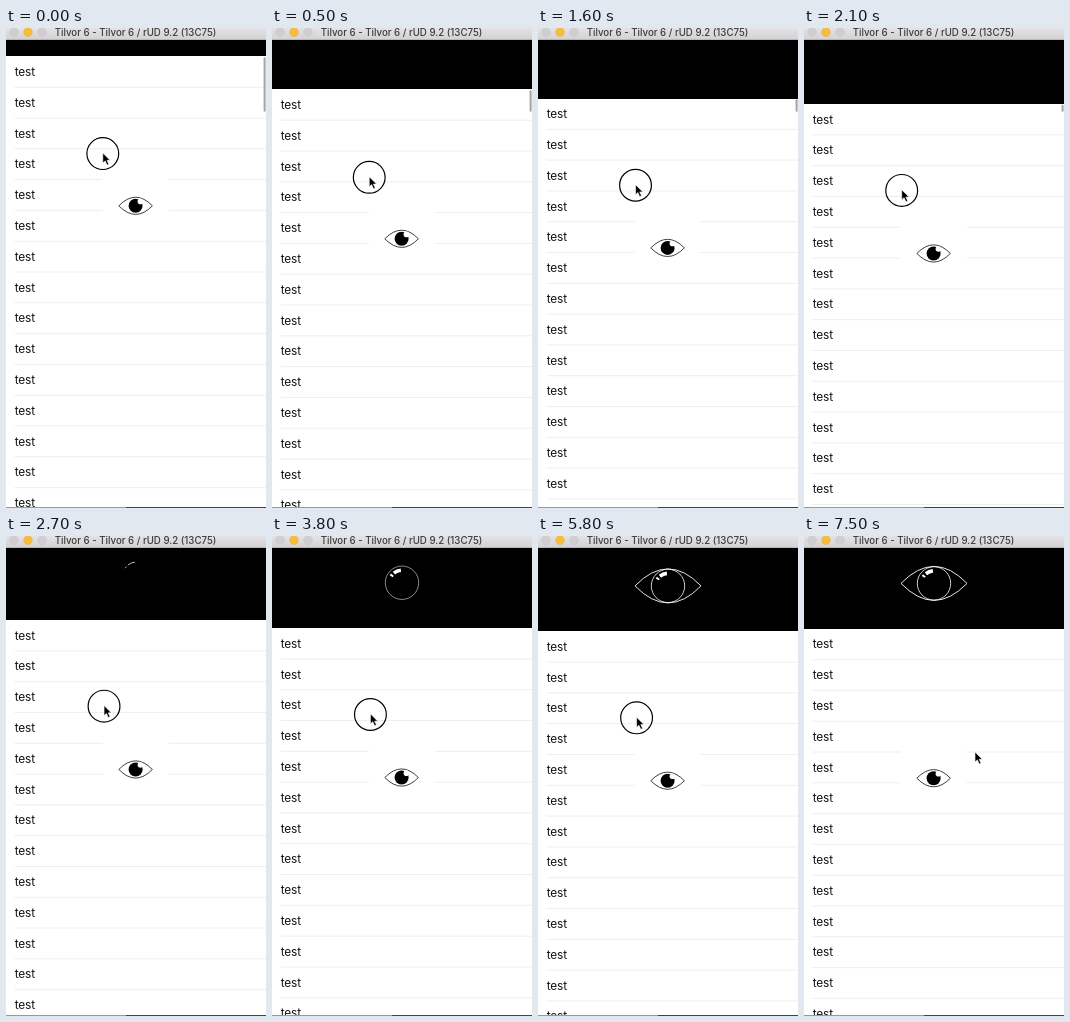
Animation of 260x480 px, one loop 8 s. Source, as an HTML page:

```html
<!DOCTYPE html>
<html lang="en">
<head>
<meta charset="utf-8">
<title>Pull to refresh</title>
<style>
  html, body { margin: 0; width: 100%; height: 100%; overflow: hidden; background: #fff; }
  svg { display: block; width: 100vw; height: 100vh; }
  text { font-family: Inter, Roboto, "Liberation Sans", sans-serif; }
  .row { font-size: 11.9px; letter-spacing: -0.2px; fill: #111; }
  .title { font-size: 9.7px; font-weight: 500; fill: #3c3c3c; text-anchor: middle; }
</style>
</head>
<body>
<svg viewBox="0 0 260 480" xmlns="http://www.w3.org/2000/svg">
  <defs>
    <linearGradient id="bar" x2="0" y2="1">
      <stop offset="0" stop-color="#e4e2e4"/>
      <stop offset="1" stop-color="#d2d0d2"/>
    </linearGradient>
  </defs>
  <rect width="260" height="480" fill="#fff"/>
  <rect id="header" y="12" width="260" fill="#000"/>

  <g id="list">
    <g id="rows"></g>
    <g transform="translate(129.6 149.4)">
      <rect x="-33" y="-33" width="66" height="66" fill="#fff"/>
      <path d="M-16.8 0Q0 -17.2 16.8 0Q0 17.2 -16.8 0Z" fill="#fff" stroke="#000" stroke-width="0.75"/>
      <circle r="7" fill="#000"/>
      <circle cx="4.8" cy="-4.4" r="2.8" fill="#fff"/>
    </g>
  </g>
  <rect id="scroll" x="257.6" width="2" rx="1" fill="#a4a4a4"/>

  <g id="eye" fill="none" stroke="#fff">
    <circle id="ball" r="16.7" stroke-width="0.8"/>
    <g id="lights"></g>
    <g id="lids" stroke-width="0.9">
      <path pathLength="1" d="M-33 0Q0 -34 33 0"/>
      <path pathLength="1" d="M-33 0Q0 34 33 0"/>
    </g>
  </g>

  <rect width="260" height="12" fill="url(#bar)"/>
  <rect y="11.4" width="260" height="0.6" fill="#a9a7a9"/>
  <g stroke-width="0.4">
    <circle cx="8" cy="4.1" r="4.4" fill="#d0ced0" stroke="#c2c0c2"/>
    <circle cx="22" cy="4.1" r="4.4" fill="#f8bc3b" stroke="#e6ab3c"/>
    <circle cx="36" cy="4.1" r="4.4" fill="#d0ced0" stroke="#c2c0c2"/>
  </g>
  <text class="title" x="129.5" y="8">Tilvor 6 - Tilvor 6 / rUD 9.2 (13C75)</text>

  <rect y="479" width="120" height="1" fill="#999"/>
  <rect x="120" y="479" width="140" height="1" fill="#444"/>

  <g id="pointer">
    <circle id="touch" cx="0" cy="0.6" r="15.9" fill="none" stroke="#000" stroke-width="1.2"/>
    <path d="M0 0V10L2.4 7.9L4.2 12L6 11.2L4.2 7.3H7.3Z" fill="#000" stroke="#fff" stroke-width="0.6"/>
  </g>
</svg>
<script>
const LOOP = 8000, STEP = 100, ROW = 30.8, TOP = 28.4;
const $ = id => document.getElementById(id);
const set = (el, attrs) => { for (const k in attrs) el.setAttribute(k, attrs[k]); };

const ramp = (t, from, to) => Math.min(1, Math.max(0, (t - from) / (to - from)));
const easeOut = (u, power) => 1 - (1 - u) ** power;

// Each stretch of the drag: start, end, distance, ease-out power
const drags = [
  [0, 500, 33, 1],
  [600, 1500, 8, 1],
  [1500, 2400, 10, 1],
  [2400, 3500, 11.7, 1.6],
  [3700, 4700, 4.2, 2.7]
];
const dragAt = t => drags.reduce((sum, [from, to, dist, power]) =>
  sum + dist * easeOut(ramp(t, from, to), power), 0);

function arc(r, from, to) {
  const at = deg => {
    const a = deg * Math.PI / 180;
    return `${r * Math.cos(a)} ${r * Math.sin(a)}`;
  };
  return `M${at(from)}A${r} ${r} 0 0 1 ${at(to)}`;
}

$("lights").innerHTML = `<path d="${arc(12.6, 211, 220)}"/><path d="${arc(12.6, 230, 265)}"/>`;

$("rows").innerHTML = Array.from({ length: 16 }, (_, i) => {
  const y = i * ROW;
  return `<text class="row" x="8.8" y="${y + 19.6}">test</text>` +
    `<path d="M8.5 ${y + ROW}H260" stroke="#ececec" stroke-width="0.9"/>`;
}).join("");

function drawEye(t, edge) {
  // Highlights thicken, then the ball fades in, then the lids are traced.
  const drawn = ramp(t, 3800, 4700);
  set($("eye"), { transform: `translate(130 ${edge - 45.4})` });
  set($("lights"), { "stroke-width": 3.6 * ramp(t, 2400, 3200) ** 1.6, opacity: t < 2500 ? 0 : 1 });
  set($("ball"), { opacity: ramp(t, 2800, 4300) });
  set($("lids"), { "stroke-dasharray": `${drawn} 2`, opacity: drawn > 0 ? 1 : 0 });
}

function drawPointer(t, drag) {
  // Follows the drag with rubber-band resistance, then glides away.
  const leave = ramp(t, 6700, 7500);
  const x = 96.8 + 0.0004 * drag ** 2;
  const y = 125 + drag * (0.6 + 0.0036 * drag);
  set($("pointer"), { transform: `translate(${x + (171 - x) * leave} ${y + (216 - y) * leave})` });
  set($("touch"), { opacity: t < 6000 ? 1 : 0 });
}

function draw(time) {
  const t = Math.floor(time / STEP) * STEP;
  const drag = dragAt(t);
  const edge = TOP + drag - 2.5 * ramp(t, 5900, 6200);

  set($("header"), { height: Math.round(edge) - 12 });
  set($("list"), { transform: `translate(0 ${edge})` });
  set($("scroll"), { y: edge + 0.8, height: Math.max(0, 83 - edge), opacity: edge < 82 ? 1 : 0 });
  drawEye(t, edge);
  drawPointer(t, drag);
}

const start = performance.now();
function tick() {
  draw((performance.now() - start) % LOOP);
  requestAnimationFrame(tick);
}
tick();
</script>
</body>
</html>
```
